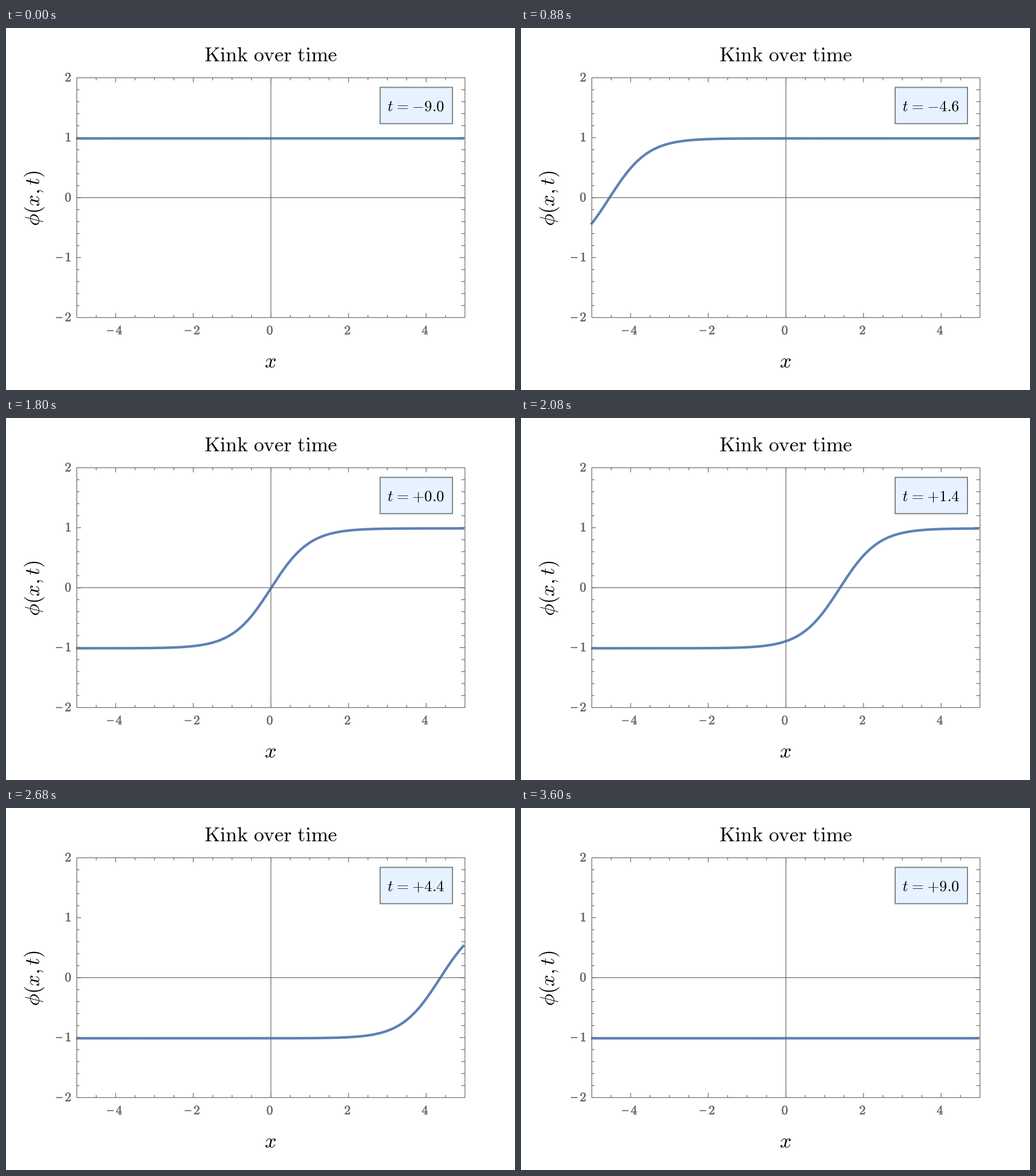
Animation, 887 px wide and 631 px high, one loop 3.64 s. Source, as a matplotlib script:

```python
import numpy as np
import matplotlib.pyplot as plt
from matplotlib.animation import FuncAnimation
from matplotlib.patches import Rectangle
from matplotlib.patheffects import withStroke

W, H, DPI = 887, 631, 64
PT = 72 / DPI  # points per pixel
FRAMES, INTERVAL = 91, 40
LEFT, RIGHT, TOP, BOTTOM = 123.4, 799.8, 86.7, 504.7
GRAY, BLUE = "#666666", "#5e81b5"
SPEED = 0.99

plt.rcParams["mathtext.fontset"] = "cm"
plt.rcParams["path.snap"] = False
fig = plt.figure(figsize=(W / DPI, H / DPI), dpi=DPI, facecolor="white")
ax = fig.add_axes([0, 0, 1, 1])
ax.set(xlim=(0, W), ylim=(H, 0))
ax.axis("off")


def px(x):
    return LEFT + (x + 5) / 10 * (RIGHT - LEFT)


def py(y):
    return BOTTOM - (y + 2) / 4 * (BOTTOM - TOP)


def rule(x0, y0, x1, y1, width=1.2):
    ax.plot([x0, x1], [y0, y1], color=GRAY, lw=width * PT, zorder=3,
            solid_capstyle="butt")


def label(x, y, text, size, color="black", **kw):
    kw = {"ha": "center", "va": "baseline", **kw}
    return ax.text(x, y, f"${text}$", fontsize=size * PT, color=color,
                   zorder=6, **kw)


def tick_label(x, y, n):
    """Digit centred on x, with a short dash in front if negative."""
    label(x, y, abs(n), 22.5, GRAY,
          path_effects=[withStroke(linewidth=0.5 * PT, foreground=GRAY)])
    if n < 0:
        rule(x - 21.5, y - 6.5, x - 10, y - 6.5, 1.7)


def draw_frame():
    ax.add_patch(Rectangle((LEFT, TOP), RIGHT - LEFT, BOTTOM - TOP, fill=False,
                           ec=GRAY, lw=1.2 * PT, zorder=3))
    rule(px(0), TOP, px(0), BOTTOM)
    rule(LEFT, py(0), RIGHT, py(0))
    for i in range(-9, 10):
        x, size = px(i / 2), 8 if i % 4 == 0 else 4.5
        rule(x, BOTTOM, x, BOTTOM - size)
        rule(x, TOP, x, TOP + size)
    for i in range(-9, 10):
        y, major = py(i / 5), i % 5 == 0
        rule(LEFT, y, LEFT + (7.5 if major else 4.5), y)
        rule(RIGHT, y, RIGHT - (9.5 if major else 6.5), y)


def draw_labels():
    for x in range(-4, 5, 2):
        tick_label(px(x) + (6.5 if x < 0 else -1.5), 534, x)
    for y in range(-2, 3):
        tick_label(108.5, py(y) + 6.5, y)
    label(461.5, 58.5, r"\mathrm{Kink\ over\ time}", 35.5)
    label(461, 592, "x", 36)
    label(58.5, 297, r"\phi(x,t)", 35.5, rotation=90, rotation_mode="anchor")


draw_frame()
draw_labels()
ax.add_patch(Rectangle((652, 103.5), 126, 63.2, fc="#e6f2ff", ec="#7f8686",
                       lw=2 * PT, zorder=5))
clock = label(664.5, 144.5, "t", 27, ha="left")
xs = np.linspace(-5.02, 4.98, 400)
curve, = ax.plot([], [], color=BLUE, lw=4.4 * PT, zorder=2,
                 solid_capstyle="butt")


def update(i):
    t = (i - 45) / 5
    curve.set_data(px(xs), py(np.tanh(xs - SPEED * t)) + 1.2)
    sign = "-" if t < 0 else "+"
    gap = r"\hspace{0.08}"
    clock.set_text(f"$t{gap} = {gap}{{{sign}}}{abs(t):.1f}$")
    return curve, clock


anim = FuncAnimation(fig, update, frames=FRAMES, interval=INTERVAL,
                     init_func=lambda: update(0), repeat=True, repeat_delay=0)
plt.show()
```
